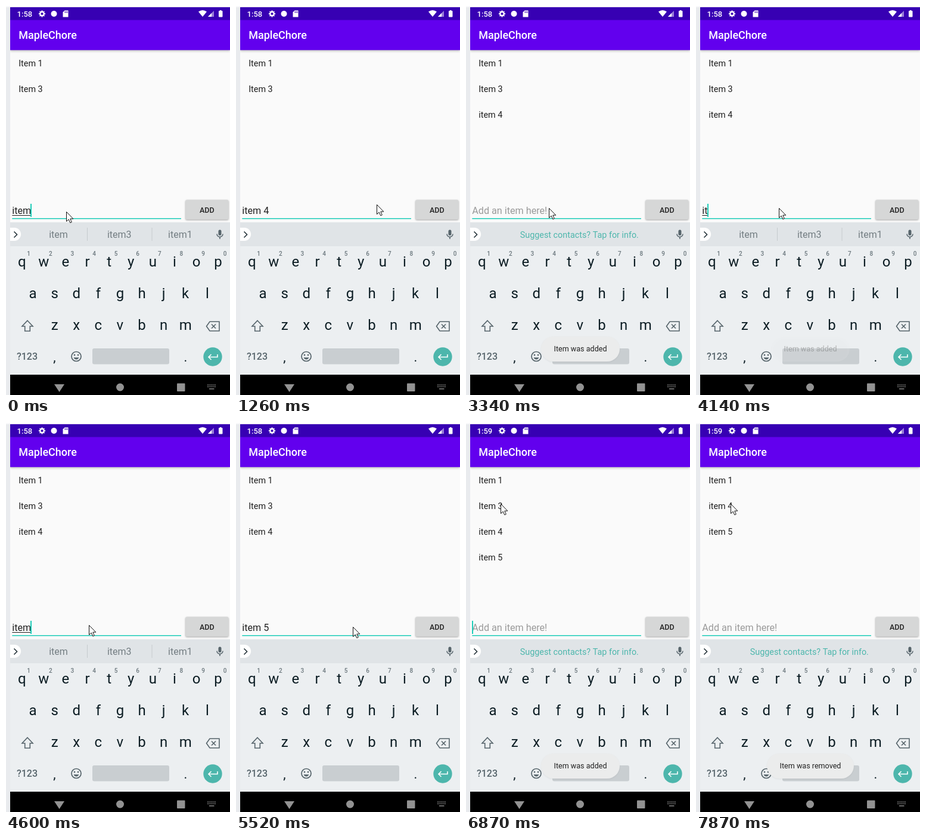
Animation, 376 px wide and 651 px high, one loop 7.99 s. Source, as an HTML page with a canvas:

```html
<!DOCTYPE html>
<html lang="en">
<head>
<meta charset="utf-8">
<title>Todo list demo</title>
<style>
html, body { margin: 0; width: 100%; height: 100%; overflow: hidden; background: #e9ebee; }
canvas { display: block; width: 376px; height: 651px; }
</style>
</head>
<body>
<canvas id="stage" width="376" height="651"></canvas>
<script>
const ctx = document.getElementById('stage').getContext('2d');
const LOOP = 7990;
const TEAL = '#4db6ac', ACCENT = '#1fcdb9', ICON = '#56646b', INK = '#0b1c23', NAV = '#929292';

// Each round types "item", a space and a digit, then taps ADD (times in ms).
const ROUNDS = [
  { first: -600, space: 470, digit: 870, add: 1920, label: 'item 4' },
  { first: 3900, space: 4750, digit: 5060, add: 5920, label: 'item 5' },
];
const KEY_GAP = 140, BLINK = 385;
const CLOCK_TICK = 5650, REMOVE = 7450;

const HOME = { x: 101, y: 344 };
const MOVES = [
  { at: 1060, time: 555, x: 329, y: 338, lift: 9 },
  { at: 2340, time: 480, x: 139, y: 338, lift: -6 },
  { at: 5440, time: 480, x: 325, y: 347, lift: 0 },
  { at: 6200, time: 600, x: 58, y: 135, lift: 0 },
];

const clamp = v => Math.min(1, Math.max(0, v));
const easeOut = p => 1 - (1 - p) ** 2;

function rect(x, y, w, h, color, r = 0) {
  ctx.fillStyle = color;
  ctx.beginPath();
  ctx.roundRect(x, y, w, h, r);
  ctx.fill();
}

function disc(x, y, r, color) {
  ctx.fillStyle = color;
  ctx.beginPath();
  ctx.arc(x, y, r, 0, Math.PI * 2);
  ctx.fill();
}

function text(str, x, y, size, color, align = 'left', weight = 400) {
  ctx.font = `${weight} ${size}px Roboto, sans-serif`;
  ctx.textAlign = align;
  ctx.fillStyle = color;
  ctx.fillText(str, x, y);
  return ctx.measureText(str).width;
}

function path(points, { fill, stroke, width = 1.6, close = !!fill }) {
  ctx.beginPath();
  points.forEach(([x, y]) => ctx.lineTo(x, y));
  if (close) ctx.closePath();
  if (fill) { ctx.fillStyle = fill; ctx.fill(); }
  if (stroke) { ctx.strokeStyle = stroke; ctx.lineWidth = width; ctx.stroke(); }
}

function arc(x, y, r, from, to, color, width) {
  ctx.strokeStyle = color;
  ctx.lineWidth = width;
  ctx.beginPath();
  ctx.arc(x, y, r, from * Math.PI, to * Math.PI);
  ctx.stroke();
}

function at(x, y, draw) {
  ctx.save();
  ctx.translate(x, y);
  draw();
  ctx.restore();
}

function withAlpha(alpha, draw) {
  if (alpha <= 0) return;
  ctx.save();
  ctx.globalAlpha = alpha;
  draw();
  ctx.restore();
}

function withShadow(color, blur, y, draw) {
  ctx.save();
  ctx.shadowColor = color;
  ctx.shadowBlur = blur;
  ctx.shadowOffsetY = y;
  draw();
  ctx.restore();
}

function drawStatusIcons() {
  at(60.5, 13, () => {
    arc(0, 0, 3.2, 0, 2, '#fff', 2.4);
    for (let i = 0; i < 8; i++) {
      ctx.rotate(Math.PI / 4);
      rect(4, -0.9, 1.6, 1.8, '#fff');
    }
  });
  disc(80.5, 13, 5, '#fff');
  path([[98.5, 7.5], [104.5, 7.5], [104.5, 18.5], [95.5, 18.5], [95.5, 10.5]], { fill: '#fff' });
  for (let i = 0; i < 3; i++) rect(98.5 + 2 * i, 9, 1, 2.5, '#3700b3');

  ctx.fillStyle = '#fff';
  ctx.beginPath();
  ctx.moveTo(330, 18);
  ctx.lineTo(323, 9.5);
  ctx.quadraticCurveTo(330, 4.5, 337, 9.5);
  ctx.fill();
  path([[339, 18], [349, 8], [349, 18]], { fill: '#9b80d9' });
  path([[339, 18], [345, 12], [345, 18]], { fill: '#fff' });
  rect(357, 8, 6.5, 10.5, '#fff', 1);
  rect(359, 7, 2.5, 2, '#fff');
}

function drawBars(t) {
  rect(0, 0, 376, 651, '#e9ebee');
  rect(0, 0, 376, 2, '#f8f8fa');
  rect(7, 2, 369, 615, '#fafafa');
  withShadow('rgba(0,0,0,.3)', 4, 1.5, () => rect(7, 23, 369, 50.8, '#6200ee'));
  rect(0, 23, 7, 57, '#e9ebee');
  rect(7, 2, 369, 21.4, '#3700b3');
  text('MapleChore', 21.2, 55, 18, '#fff', 'left', 500);
  text(t < CLOCK_TICK ? '1:58' : '1:59', 18.6, 18, 13, '#fff', 'left', 500);
  drawStatusIcons();
}

function drawList(t) {
  const rows = ['Item 1', 'Item 3'].map(label => ({ label, alpha: 1 }));
  for (const { label, add } of ROUNDS) rows.push({ label, alpha: clamp((t - add - 90) / 180) });
  if (t >= REMOVE) rows.splice(1, 1);
  rows.forEach(({ label, alpha }, i) =>
    withAlpha(alpha, () => text(label, 21.2, 101 + Math.round(43.1 * i), 14.37, '#1f1f1f')));
}

function inputState(t) {
  const round = t < ROUNDS[1].first ? ROUNDS[0] : ROUNDS[1];
  const { first, space, digit, add, label } = round;
  const sinceAdd = t - add;
  if (sinceAdd >= 0) {
    return { value: '', sinceAdd, idle: sinceAdd, hints: sinceAdd < 270 ? null : 'Suggest contacts? Tap for info.' };
  }
  if (t >= digit) return { value: label, idle: t - digit, hints: null };
  if (t >= space) return { value: 'item ', idle: t - space, hints: ['2', '3', '1'] };
  const typed = 1 + Math.floor((t - first) / KEY_GAP);
  return { value: 'item'.slice(0, typed), composing: true, idle: 0, hints: ['item', 'item3', 'item1'] };
}

function drawInput({ value, composing, idle, sinceAdd }) {
  const width = text(value, 10.3, 348, 16.16, '#212121');
  if (!value) text('Add an item here!', 10.3, 348, 16.16, '#9a9a9a');
  if (composing) rect(10.3, 350, width, 1, '#212121');
  rect(10.3, 355, 283.7, 1.6, ACCENT);
  if (Math.floor(idle / BLINK) % 2 === 0) rect(Math.floor(10 + width), 331, 2, 22, ACCENT);

  const fill = sinceAdd < 200 ? '#b5b7b6' : '#d6d7d7';
  withShadow('rgba(0,0,0,.35)', 3, 1, () => rect(301.4, 324.6, 72, 32.6, fill, 2));
  text('ADD', 337.3, 346, 12.57, '#212121', 'center', 500);
}

function drawSuggestions(hints) {
  rect(7, 362, 369, 40, '#e0e4e7');
  rect(7, 371, 18, 22, '#fff', [0, 11, 11, 0]);
  path([[13.5, 377.5], [18.5, 382.5], [13.5, 387.5]], { stroke: '#26343a' });

  rect(356.5, 374.5, 5, 9.5, ICON, 2.5);
  arc(359, 381.5, 5, 0, 1, ICON, 1.5);
  rect(358.2, 386, 1.6, 4, ICON);

  if (Array.isArray(hints)) {
    hints.forEach((hint, i) => text(hint, 88 + 102.2 * i, 388, 16, '#737d82', 'center'));
    for (const x of [136, 244.5]) rect(x, 371, 1, 22, '#c6cbce');
  } else if (hints) {
    text(hints, 190.3, 388, 14.37, TEAL, 'center');
  }
}

function drawKeys() {
  const gap = 36.6;
  const row = (keys, y, size, color, shift = 0, weight = 400) => [...keys].forEach((key, i) =>
    text(key, 191.4 + shift + gap * (i - (keys.length - 1) / 2), y, size, color, 'center', weight));
  rect(7, 402, 369, 215, '#eceff1');
  row('qwertyuiop', 436, 24, INK);
  row('asdfghjkl', 489, 24, INK);
  row('zxcvbnm', 542, 24, INK);
  row('1234567890', 418, 10, '#6b777d', 11.5, 500);
  text('?123', 35.5, 592, 16, ICON, 'center', 500);
  text(',', 81.5, 595, 22, INK, 'center');
  text('.', 301.5, 595, 22, INK, 'center');
  rect(145, 573, 129, 26.5, '#c9ced1', 3);

  at(36, 535.5, () => path([[0, -9], [9, 0.5], [4.3, 0.5], [4.3, 8.5], [-4.3, 8.5], [-4.3, 0.5], [-9, 0.5]],
    { stroke: ICON, close: true }));
  at(348, 536, () => {
    path([[-11.5, 0], [-6, -7.7], [10, -7.7], [10, 7.7], [-6, 7.7]], { stroke: ICON, close: true });
    for (const s of [-1, 1]) path([[-3, -3.5 * s], [4, 3.5 * s]], { stroke: ICON });
  });
  at(118, 586.5, () => {
    arc(0, 0, 8, 0, 2, ICON, 1.7);
    for (const s of [-1, 1]) disc(3 * s, -2.4, 1.3, ICON);
    ctx.beginPath();
    ctx.arc(0, 0.2, 4.7, 0.1 * Math.PI, 0.9 * Math.PI);
    ctx.fill();
  });
  at(347, 587, () => {
    disc(0, 0, 15.7, TEAL);
    path([[8, -4], [8, 0.5], [-6.5, 0.5]], { stroke: '#fff' });
    path([[-2.5, -4], [-7, 0.5], [-2.5, 5]], { stroke: '#fff' });
  });
}

function drawNavigation() {
  rect(7, 617, 369, 34, '#000');
  path([[81, 633], [98, 633], [89.5, 646]], { fill: NAV });
  disc(191.5, 638, 6.5, NAV);
  rect(287, 631.5, 13.5, 13.5, NAV, 1);
  for (let i = 0; i < 12; i++) rect(338 + (i % 6) * 2.5, 633.5 + (i / 6 | 0) * 3, 1.4, 1.4, NAV);
  rect(341, 640, 8.5, 1.4, NAV);
}

function drawToast(message, t, from, until) {
  withAlpha(Math.min(clamp((t - from) / 300), clamp((until - t) / 250)), () => {
    const width = text(message, 192, 578, 12.57, '#212121', 'center') + 43;
    withShadow('rgba(0,0,0,.06)', 3, 1, () => rect(192 - width / 2, 553, width, 42, '#ebecec', 21));
    text(message, 192, 578, 12.57, '#212121', 'center');
  });
}

function drawPointer(t) {
  let { x, y } = HOME;
  for (const move of MOVES) {
    const p = easeOut(clamp((t - move.at) / move.time));
    x += (move.x - x) * p;
    y += (move.y - y) * p - move.lift * Math.sin(Math.PI * p);
  }
  at(Math.round(x) + 0.5, Math.round(y) + 0.5, () =>
    path([[0, 0], [0, 16], [3.7, 12.6], [6.3, 18.3], [8.8, 17.2], [6.3, 11.6], [11.3, 11.6]],
      { fill: '#fff', stroke: '#111', width: 1 }));
}

function render(t) {
  const input = inputState(t);
  drawBars(t);
  drawList(t);
  drawInput(input);
  drawSuggestions(input.hints);
  drawKeys();
  drawNavigation();
  for (const { add } of ROUNDS) {
    drawToast('Item was added', t, add + 90, Math.min(add + 2260, REMOVE + 150));
  }
  drawToast('Item was removed', t, REMOVE + 50, Infinity);
  drawPointer(t);
}

const start = performance.now();
function loop() {
  render((performance.now() - start) % LOOP);
  requestAnimationFrame(loop);
}
loop();
</script>
</body>
</html>
```
